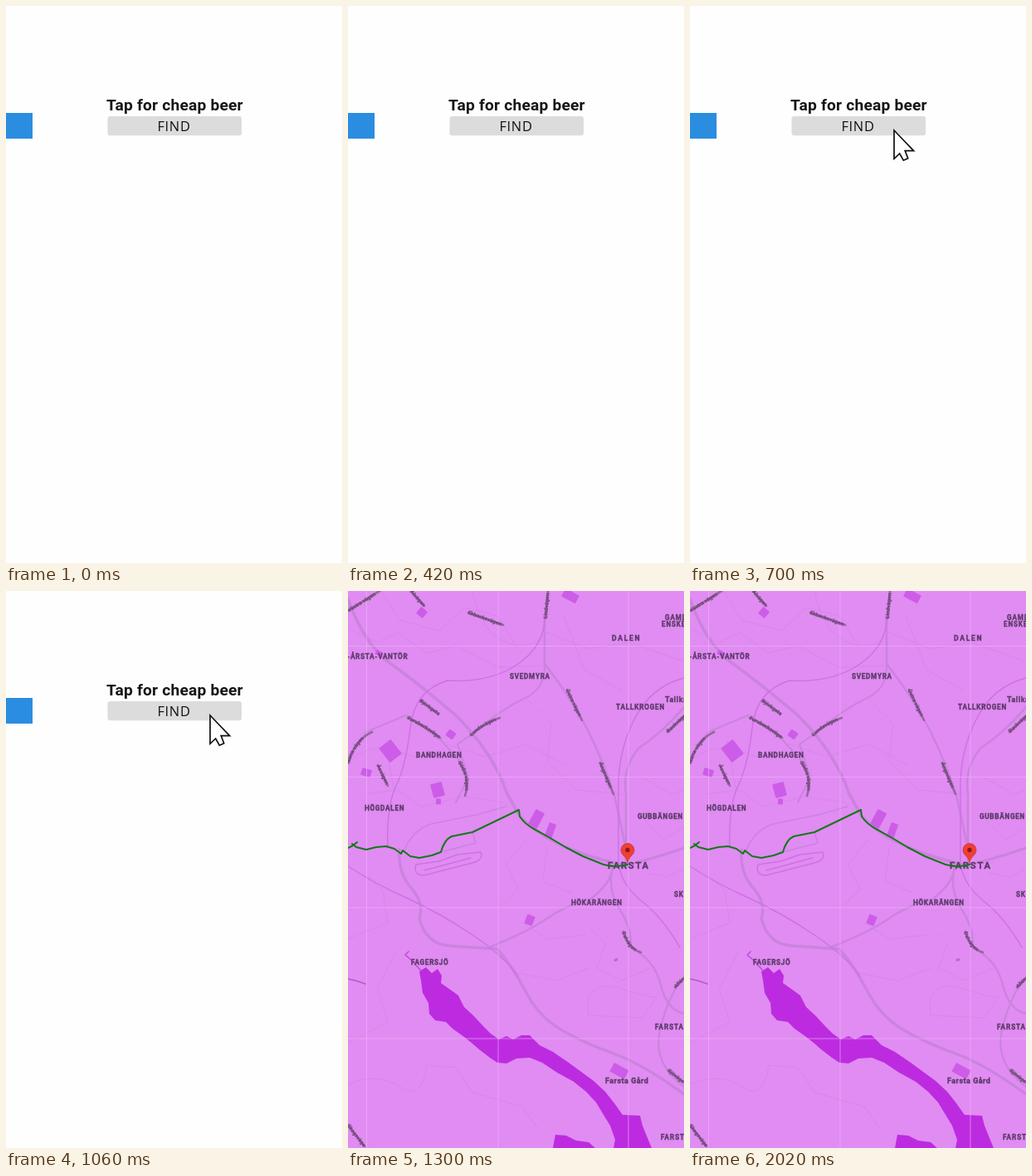
These frames come from a looping animation (405 by 672 pixels, 2.5 s). An HTML page:

```html
<!DOCTYPE html>
<html lang="en">
<head>
<meta charset="utf-8">
<title>Find cheap beer</title>
<style>
  html, body { margin: 0; width: 100%; height: 100%; overflow: hidden; background: #fefefe; }
  svg { display: block; width: 405px; height: 672px; }
  .title { font: 600 19.2px Roboto, Arial, sans-serif; letter-spacing: .2px; fill: #161616; }
  .find { font: 16.4px "Open Sans", sans-serif; letter-spacing: .7px; fill: #111; }
  #map path { fill: none; stroke-linecap: round; stroke-linejoin: round; }
  #map text { font-family: Roboto, Arial, sans-serif; fill: #5c3a69; }
  #places text { font-weight: 700; stroke: #5c3a69; stroke-width: .35px; }
  #streets text { font-size: 6.6px; font-weight: 700; fill: #64436f; }
  #cursor, #map { opacity: 0; }
</style>
</head>
<body>
<svg viewBox="0 0 405 672">
  <rect width="405" height="672" fill="#fefefe"/>
  <rect y="129" width="32" height="31" fill="#2a8de0"/>
  <text class="title" x="203.4" y="126" text-anchor="middle">Tap for cheap beer</text>
  <rect x="122.5" y="133" width="161.5" height="23.3" rx="3" fill="#dcdcdc"/>
  <text class="find" x="182.4" y="150.6">FIND</text>
  <path id="cursor" d="M246 150V184.300L252.700 178L257.300 186.200L262.700 183.800L259.200 174.600H269.600Z"
        fill="#fff" stroke="#111" stroke-width="1.7"/>
  <g id="map">
    <rect width="405" height="672" fill="#e08cf2"/>
    <g id="lanes"></g>
    <g id="roads"></g>
    <g id="blocks" fill="#cd5ce8"></g>
    <g fill="#bd2be0">
      <polygon points="86,459 94,454 101,461 108,456 113,464 112,473 122,480 133,488 140,502 151,512 162,524 172,534 182,541 191,537 199,541 209,536 219,536 231,548 247,556 266,569 281,580 296,591 310,604 321,618 331,632 352,633 355,645 361,660 366,672 320,672 322,662 316,645 308,632 299,617 287,604 272,592 252,581 234,569 219,563 203,564 191,570 180,569 171,563 158,553 150,546 140,538 126,528 118,520 105,518 98,510 97,497 90,485 88,470"/>
      <polygon points="247,672 250,656 263,657 275,663 290,665 298,672"/>
    </g>
    <path d="M73 435L69 439L76 445L88 458" stroke="#c04bdc" stroke-width="1.6"/>
    <path d="M0 468L9 470L21 474" stroke="#b756cf" stroke-width="1.4"/>
    <path d="M22.500 0V672M181 0V672M338 0V672M0 66.500H405M0 224.500H405M0 382H405M0 540H405"
          stroke="#f0b4fa" stroke-opacity=".6" stroke-width="1"/>
    <g id="streets"></g>
    <g id="places"></g>
    <path d="M0 310L6 307L11 303M5 305L10 309L22 312L34 309L46 308L56 311L64 317L66 313L75 320L86 322L101 319L112 315Q116 300 125 296L150 291L206 264L207 272Q213 281 224 287L242 297L262 309L283 320L308 330Q322 334 337 330"
          stroke="#147719" stroke-width="2"/>
    <path d="M337 328C336 320 329 319 329 312.500A8 8 0 0 1 345 312.500C345 319 338 320 337 328Z"
          style="fill:#ed4035" stroke="#c9302b" stroke-width=".7"/>
    <circle cx="337" cy="312.500" r="2.700" fill="#8d1717"/>
  </g>
</svg>
<script>
const NS = "http://www.w3.org/2000/svg";
const $ = id => document.getElementById(id);

function add(parent, tag, attrs, text) {
  const el = document.createElementNS(NS, tag);
  for (const key in attrs) el.setAttribute(key, attrs[key]);
  if (text) el.textContent = text;
  return parent.appendChild(el);
}

// Faint side streets
[
  "M0 45L35 62L60 50L95 75L130 66L180 92L238 90",
  "M40 0L62 35L110 48L140 20L180 30L205 70",
  "M150 0Q160 50 190 62T240 50L290 70L338 62L405 85",
  "M0 205Q30 180 65 195T120 185L165 200L215 185L262 210",
  "M20 245L60 240L88 260L140 248L185 255M45 180L55 238",
  "M215 130L245 160L240 205L275 240L330 245M260 30L285 95L330 120",
  "M20 340L42 362L48 400L0 420M58 435L35 480L48 520L0 545",
  "M215 300L190 330L205 360L182 382M240 310L235 350L270 365",
  "M0 595Q35 580 62 598T95 572L130 575L150 605L210 622L230 650",
  "M285 400L310 425L300 455L330 470L365 455M290 490Q300 470 330 480T372 490L355 515L290 512Z",
  "M355 225L390 245L405 240M355 275L380 300L405 285M360 340L385 345L405 335",
  "M210 400L240 420L285 415M200 460L250 470L290 455"
].forEach(d => add($("lanes"), "path", { d, stroke: "#d886ea", "stroke-width": 1 }));

// Main roads and rails: path, width, colour
const road = "#cb83de", rail = "#cf6fe6";
[
  ["M0 10Q20 65 52 88T130 150Q175 195 192 245L206 270Q220 287 250 303T337 332", 3.6, road],
  ["M0 24L38 0", 4, "#c88bc9"],
  ["M242 0L237 30V88Q270 130 290 170T322 250L337 320", 2.6, road],
  ["M237 90Q238 118 212 130T150 172L132 185L145 225L130 255", 2, road],
  ["M0 200L22 170L70 150L110 178L135 205", 2, road],
  ["M62 312Q60 340 76 358T86 395Q94 426 122 428T180 432Q198 452 214 483T258 530T320 558T405 607", 3.4, road],
  ["M172 429Q215 412 240 395T292 372Q318 352 319 333", 2.6, road],
  ["M319 333Q350 329 405 310", 3, road],
  ["M68 312Q80 285 105 280L155 270L190 260M112 315L154 304L150 291", 1.6, road],
  ["M405 140Q380 170 350 190Q330 215 335 245V332", 2.4, road],
  ["M319 333Q312 360 328 385T340 430Q370 445 377 475T405 510", 2.4, road],
  ["M405 465Q385 490 376 530T405 598", 2.2, road],
  ["M237 30Q238 65 205 88T120 108Q80 120 75 165T58 235T48 310", 1.4, rail],
  ["M0 332Q30 352 70 370T150 415T205 465", 1.4, rail],
  ["M405 105Q365 115 345 155T326 240V330Q330 355 355 375T400 430", 1.4, rail],
  ["M82 330Q78 343 92 343L150 328Q164 324 160 315L132 318L110 326ZM92 337L148 322", 1.4, "#cf70e4"]
].forEach(([d, width, stroke]) => add($("roads"), "path", { d, stroke, "stroke-width": width }));

// Buildings: centre, size, angle
[
  [89, 26, 10, 10, 40], [268, 6, 19, 11, 28], [124, 173, 10, 9, 35], [51, 193, 18, 22, -38],
  [22, 219, 12, 9, 18], [108, 240, 14, 17, -15], [227, 275, 12, 21, 28], [244, 289, 9, 18, 20],
  [219, 397, 10, 12, 22], [327, 579, 20, 12, 28], [37, 75, 8, 6, 30], [109, 254, 6, 7, 0], [323, 445, 5, 3, -20]
].forEach(([x, y, w, h, a]) => add($("blocks"), "rect",
  { x: x - w / 2, y: y - h / 2, width: w, height: h, rx: 1, transform: `rotate(${a} ${x} ${y})` }));

// Street names set along short curves
[
  ["M145 26Q165 33 187 41", "Ekbacksvägen"],
  ["M238 33L241 0", "Lindvägen"],
  ["M76 0L92 18", "Alvägen"],
  ["M87 132L109 148", "Björkgatan"],
  ["M72 153Q92 162 111 177", "Furubacksvägen"],
  ["M148 174Q162 160 183 153", "Lundavägen"],
  ["M0 208Q8 180 29 170", "Norra vägen"],
  ["M36 210L48 235", "Åsvägen"],
  ["M134 206Q148 226 141 247", "Södra vägen"],
  ["M264 119L282 156", "Östra vägen"],
  ["M304 207L320 245", "Ängsvägen"],
  ["M385 170L405 151", "Backvägen"],
  ["M332 411Q338 431 353 436", "Dalvägen"],
  ["M386 578L405 593", "Sjövägen"],
  ["M0 644L20 670", "Skogsvägen"],
  ["M394 478L405 467", "Allén"],
  ["M0 24L38 0", "Västra vägen"]
].forEach(([d, name], i) => {
  const id = "street" + i;
  add($("streets"), "path", { d, id, stroke: "#97659f", "stroke-width": 2.6 });
  const label = add($("streets"), "text", { dy: 2 });
  add(label, "textPath", { href: "#" + id }, name);
});

// Districts: name, left, baseline, size, spacing
[
  ["-ÅRSTA-VANTÖR", -1, 81.5, 8.2, .7],
  ["DALEN", 318, 60, 8.6, 1.7],
  ["GAMLA", 382, 34.5, 8.2, .8],
  ["ENSKEDE", 378, 42.5, 8.2, .8],
  ["SVEDMYRA", 195, 105.5, 8.2, .7],
  ["TALLKROGEN", 323, 143, 8.2, .8],
  ["BANDHAGEN", 82, 200.5, 8.2, .7],
  ["HÖGDALEN", 20, 265, 8.2, .7],
  ["GUBBÄNGEN", 349, 275, 8.2, .7],
  ["FARSTA", 313, 335, 11.2, 1.7],
  ["HÖKARÄNGEN", 269, 379, 8.2, .7],
  ["SKÖNDAL", 393, 369, 8.2, .8],
  ["FAGERSJÖ", 76, 451, 8.2, .7],
  ["FARSTA", 370, 528.5, 8.2, .9],
  ["FARSTA", 377, 661.5, 8.2, .9],
  ["Tallkrogen", 382, 134, 9, .6],
  ["Farsta Gård", 310, 593.5, 9, .5]
].forEach(([name, x, y, size, gap]) => add($("places"), "text",
  { x, y, "font-size": size, "letter-spacing": gap }, name));

const LOOP = 2500;
function showFrom(el, ms) {
  el.animate([
    { opacity: 0, offset: 0, easing: "steps(1, end)" },
    { opacity: 1, offset: ms / LOOP },
    { opacity: 1, offset: 1 }
  ], { duration: LOOP, iterations: Infinity });
}
showFrom($("cursor"), 700);
showFrom($("map"), 1300);
</script>
</body>
</html>
```
